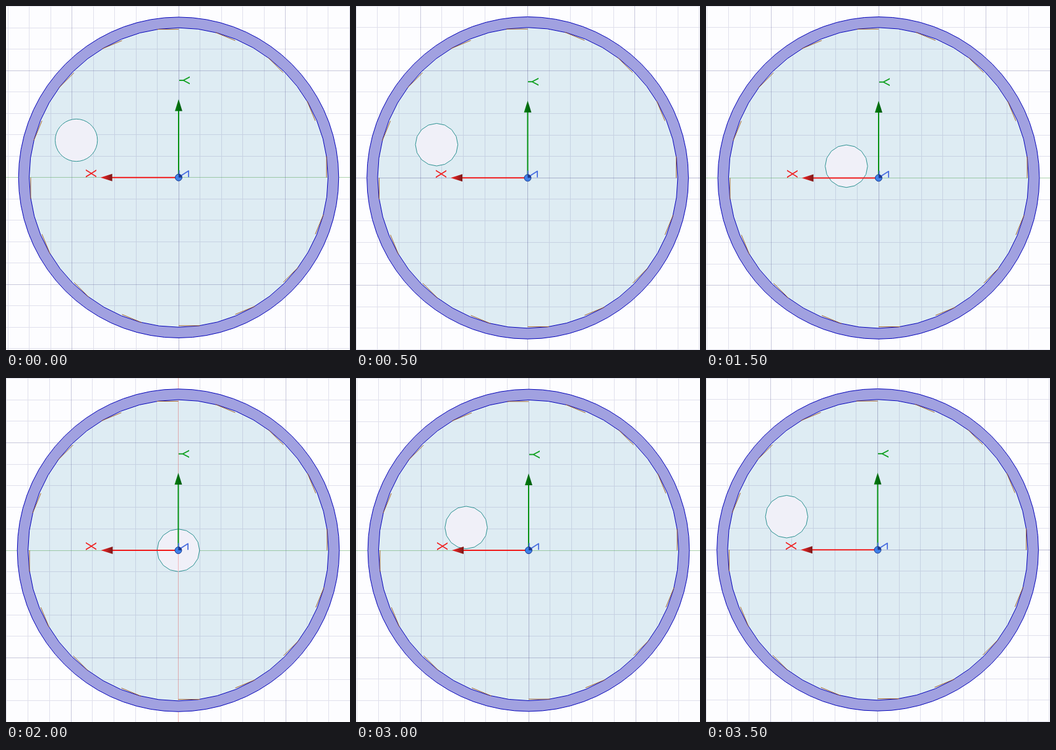
These frames come from a looping animation (556x555 px, 4000 ms). An HTML page:

```html
<!DOCTYPE html>
<html lang="en">
<head>
<meta charset="utf-8">
<title>Moving hole in a disc</title>
<style>
html, body { margin: 0; width: 100%; height: 100%; overflow: hidden; background: #fdfdff; }
svg { display: block; width: 556px; height: 555px; }
text { font: 23px "Open Sans", sans-serif; text-anchor: middle; }
</style>
</head>
<body>
<svg id="stage" viewBox="0 0 556 555" xmlns="http://www.w3.org/2000/svg">
  <defs>
    <linearGradient id="red"><stop offset="0" stop-color="#f02020"/><stop offset=".45" stop-color="#c82020"/><stop offset="1" stop-color="#7a1818"/></linearGradient>
    <linearGradient id="green"><stop offset="0" stop-color="#00800c"/><stop offset="1" stop-color="#005a10"/></linearGradient>
  </defs>
  <path id="disc" fill="#deecf3"/>
  <g fill="none" stroke="#50508c" shape-rendering="crispEdges">
    <path id="minor" stroke-opacity=".17"/>
    <path id="major" stroke-opacity=".31"/>
    <path id="axisX"/>
    <path id="axisY"/>
  </g>
  <path id="ring" fill="#a1a1e0" fill-rule="evenodd" stroke="#0000b8"/>
  <path id="ticks" fill="none" stroke="#a0602c"/>
  <path id="hole" fill="#f0f0f8" stroke="#2a9090"/>
  <path id="holeAxis" stroke="#f0b8bc" shape-rendering="crispEdges"/>
  <path id="lineX" stroke="#f01818" stroke-width="2"/>
  <path id="lineY" stroke="#009010" stroke-width="2"/>
  <path id="headX" fill="url(#red)"/>
  <path id="headY" fill="url(#green)"/>
  <text id="labelZ" fill="#4a6ee0">Z</text>
  <g id="ball">
    <circle r="5.5" fill="#4080e8" stroke="#183a90"/>
    <path d="M0 0V-5.5A5.5 5.5 0 0 1 5.5 0Z" fill="#1c3888"/>
  </g>
  <text id="labelX" fill="#f02020">X</text>
  <text id="labelY" fill="#10a020">Y</text>
</svg>
<script>
const W = 556, H = 555, STEP = 500;
const $ = Object.fromEntries([...document.querySelectorAll("#stage [id]")].map(e => [e.id, e]));
const GREEN = ["#3c963c", .42], RED = ["#e06868", .5], GREY = ["#50508c", .38];

// u: grid unit, (x, y): centre, len: axis length, d: hole distance in units
const poses = [
  { u: 34.5, x: 279, y: 276.7, len: 126.3, d: 5.1, sides: 36, ax: GREEN, ay: GREY },
  { u: 34.65, x: 277.5, y: 277.3, len: 124.5, d: 4.52, sides: 16, ax: GREY, ay: GREY },
  { u: 34.65, x: 279, y: 278, len: 124, d: 3.1, sides: 16, ax: GREEN, ay: GREY },
  { u: 34.65, x: 279, y: 277.4, len: 124.3, d: 1.6, sides: 16, ax: GREEN, ay: GREY },
  { u: 34.7, x: 278.5, y: 278, len: 125, d: 0, sides: 16, ax: GREEN, ay: RED }
];

const set = (el, attrs) => { for (const k in attrs) el.setAttribute(k, attrs[k]); };
const path = (el, d) => el.setAttribute("d", d);
const crisp = v => Math.floor(v) + .5;
const vert = x => `M${crisp(x)} 0V${H}`;
const horiz = y => `M0 ${crisp(y)}H${W}`;

function polygon(cx, cy, r, n) {
  let d = "";
  for (let i = 0; i < n; i++) {
    const a = 2 * Math.PI * i / n;
    d += `${i ? "L" : "M"}${(cx + r * Math.cos(a)).toFixed(2)} ${(cy + r * Math.sin(a)).toFixed(2)}`;
  }
  return d + "Z";
}

function drawGrid(p) {
  let minor = "", major = "";
  for (let i = -8; i <= 8; i++) {
    if (!i) continue;
    const d = vert(p.x + i * p.u) + horiz(p.y + i * p.u);
    if (i % 5) minor += d; else major += d;
  }
  path($.minor, minor);
  path($.major, major);
  set($.axisX, { d: horiz(p.y), stroke: p.ax[0], "stroke-opacity": p.ax[1] });
  set($.axisY, { d: vert(p.x), stroke: p.ay[0], "stroke-opacity": p.ay[1] });
}

function drawDisc(p) {
  const { x, y, u } = p, inner = polygon(x, y, 7 * u, 48);
  path($.disc, inner);
  path($.ring, polygon(x, y, 7.5 * u, 72) + inner);
  let d = "";
  for (let i = 0; i < 16; i++) {
    const a = i * Math.PI / 8, c = Math.cos(a), s = Math.sin(a), r = 6.93 * u;
    d += `M${x + r * c} ${y + r * s}l${u * s} ${-u * c}`;
  }
  path($.ticks, d);
}

function drawHole(p) {
  const a = 20 * Math.PI / 180, r = p.d * p.u;
  path($.hole, polygon(p.x - r * Math.cos(a), p.y - r * Math.sin(a), .99 * p.u, p.sides));
  path($.holeAxis, p.ay === RED ? `M${crisp(p.x)} ${p.y - p.u}v${2 * p.u}` : "");
}

function drawAxes(p) {
  const { x, y, len } = p, tx = x - len, ty = y - len;
  path($.lineX, `M${x} ${y}H${tx + 18}`);
  path($.lineY, `M${x} ${y}V${ty + 18}`);
  path($.headX, `M${tx} ${y}l19 -6v12z`);
  path($.headY, `M${x} ${ty}l6 19h-12z`);
  set($.ball, { transform: `translate(${x} ${y})` });
  // a turned glyph has its baseline on the left
  const turn = (el, cx, cy, flip) =>
    set(el, { transform: `translate(${cx - 8.2} ${cy}) rotate(90) scale(${flip} 1)` });
  turn($.labelX, tx - 16, y - 6.5, 1);
  turn($.labelY, x + 9, ty - 30.5, 1);
  turn($.labelZ, x + 8, y - 6, -1);
}

let shown = -1;
function frame(now) {
  const k = Math.floor(now / STEP) % 8;
  const i = k > 4 ? 8 - k : k;
  if (i !== shown) {
    shown = i;
    const p = poses[i];
    drawGrid(p);
    drawDisc(p);
    drawHole(p);
    drawAxes(p);
  }
}

const start = performance.now();
function loop() {
  frame(performance.now() - start);
  requestAnimationFrame(loop);
}
loop();
</script>
</body>
</html>
```
